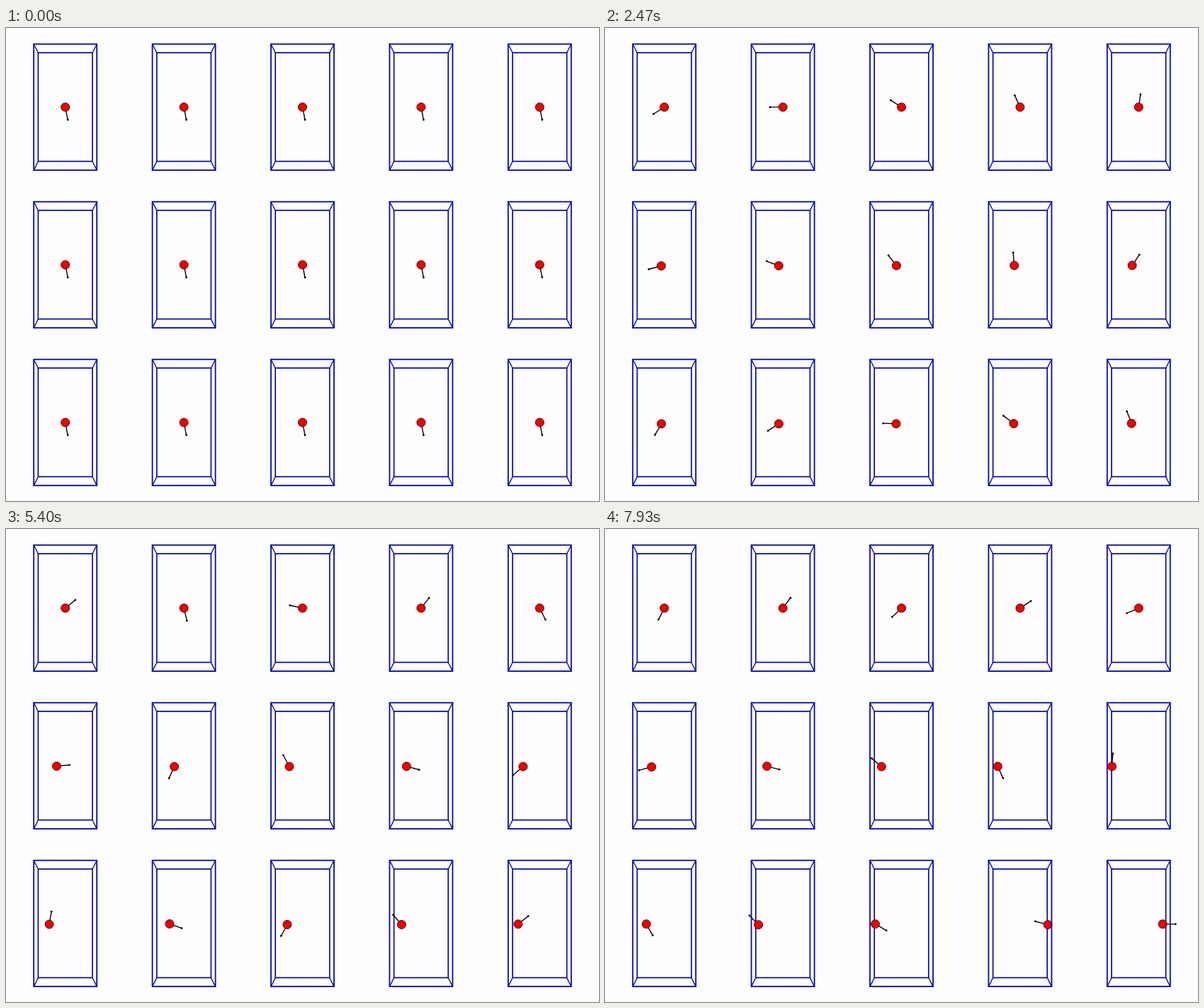
An HTML page with a canvas for the animation above (8 s loop, 837 by 669 pixels).

```html
<!DOCTYPE html>
<html>
<head>
<meta charset="utf-8">
<style>
  html, body { margin: 0; width: 100%; height: 100%; overflow: hidden; background: #fdfdfd; }
  canvas { display: block; }
</style>
</head>
<body>
<canvas id="stage" width="837" height="669"></canvas>
<script>
const ctx = document.getElementById('stage').getContext('2d');
const LOOP = 8000, FPS = 15, START = 0.55;
const BLUE = '#0808a8', WRAP = 82.3, DEG = Math.PI / 180;
const START_ANGLE = 79, TAIL = 18.2;

// Behaviour of each row; `drift` is the leftward speed, `sway` the wobble of the path.
const rows = [
  { spin: 1, shift: () => 0, ripple: () => 0, phase: 0, drift: () => 0, lag: () => 1, sway: 0, lead: 0, sink: 0 },
  { spin: 1.1, shift: (k, u) => 5 * settle(u) + 45 * u * Math.exp(-2 * u), ripple: k => 5 - 0.4 * k, phase: 0,
    drift: k => 2.55 + 0.67 * k, lag: k => 0.9 / (1 + 0.3 * k), sway: 133, lead: 0, sink: 0.95 },
  { spin: 0.875, shift: (k, u) => (1.2 * k - 14) * settle(u), ripple: k => 8.5 - 0.9 * k, phase: 62,
    drift: k => 3.92 + 0.88 * k, lag: () => 1.07, sway: 215, lead: 8, sink: 1.2 }
];

const sin = a => Math.sin(a * DEG);
const cos = a => Math.cos(a * DEG);
const settle = u => 1 - Math.exp(-2 * u);
// Distance covered at unit speed when the speed is approached with a time lag.
const travel = (u, lag) => u - lag * (1 - Math.exp(-u / lag));

function pose(row, k, t) {
  const u = Math.max(0, t - START);
  const rate = row.spin * (61.5 + 29.4 * k);
  const mean = START_ANGLE + rate * travel(u, 0.92) + row.shift(k, u);
  const angle = mean + row.ripple(k) * settle(u) * cos(2 * (mean - row.phase));
  const radius = row.sway / rate;
  let x = radius * (sin(angle - row.lead) - sin(START_ANGLE - row.lead))
    - row.drift(k) * travel(u, row.lag(k));
  if (x < -WRAP / 2) x += WRAP;
  const y = row.sink * settle(u) - 0.28 * radius * (cos(angle) - cos(START_ANGLE));
  return { x, y, angle };
}

function line(x1, y1, x2, y2) {
  ctx.beginPath();
  ctx.moveTo(x1, y1);
  ctx.lineTo(x2, y2);
  ctx.stroke();
}

function disc(x, y, r) {
  ctx.beginPath();
  ctx.arc(x, y, r, 0, 2 * Math.PI);
  ctx.fill();
}

function drawBack() {
  ctx.strokeStyle = BLUE;
  ctx.lineWidth = 1.7;
  ctx.strokeRect(-38.3, -77, 76.6, 153.7);
  ctx.lineWidth = 1.4;
  for (const sx of [-1, 1])
    for (const sy of [-1, 1]) line(sx * 44.5, sy * 89.2, sx * 38.3, sy * 76.9);
}

function drawFront() {
  ctx.strokeStyle = BLUE;
  ctx.lineWidth = 1.8;
  ctx.strokeRect(-44.5, -89.2, 89, 178.4);
}

function drawBall({ x, y, angle }) {
  const tipX = x + TAIL * cos(angle), tipY = y + TAIL * sin(angle);
  ctx.strokeStyle = ctx.fillStyle = '#000';
  ctx.lineWidth = 1.4;
  line(x, y, tipX, tipY);
  disc(tipX, tipY, 1.4);
  ctx.fillStyle = '#ee0000';
  disc(x, y, 6);
  ctx.strokeStyle = '#500';
  ctx.lineWidth = 1;
  ctx.stroke();
}

function draw(t) {
  ctx.fillStyle = '#fdfdfd';
  ctx.fillRect(0, 0, 837, 669);
  rows.forEach((row, j) => {
    for (let k = 0; k < 5; k++) {
      ctx.save();
      ctx.translate(83.7 + 167.4 * k, 111.9 + 223 * j);
      drawBack();
      drawBall(pose(row, k, t));
      drawFront();
      ctx.restore();
    }
  });
}

const origin = performance.now();
function tick() {
  const ms = (performance.now() - origin) % LOOP;
  draw(Math.floor((ms + 5) * FPS / 1000) % (LOOP * FPS / 1000) / FPS);
  requestAnimationFrame(tick);
}
tick();
</script>
</body>
</html>
```
